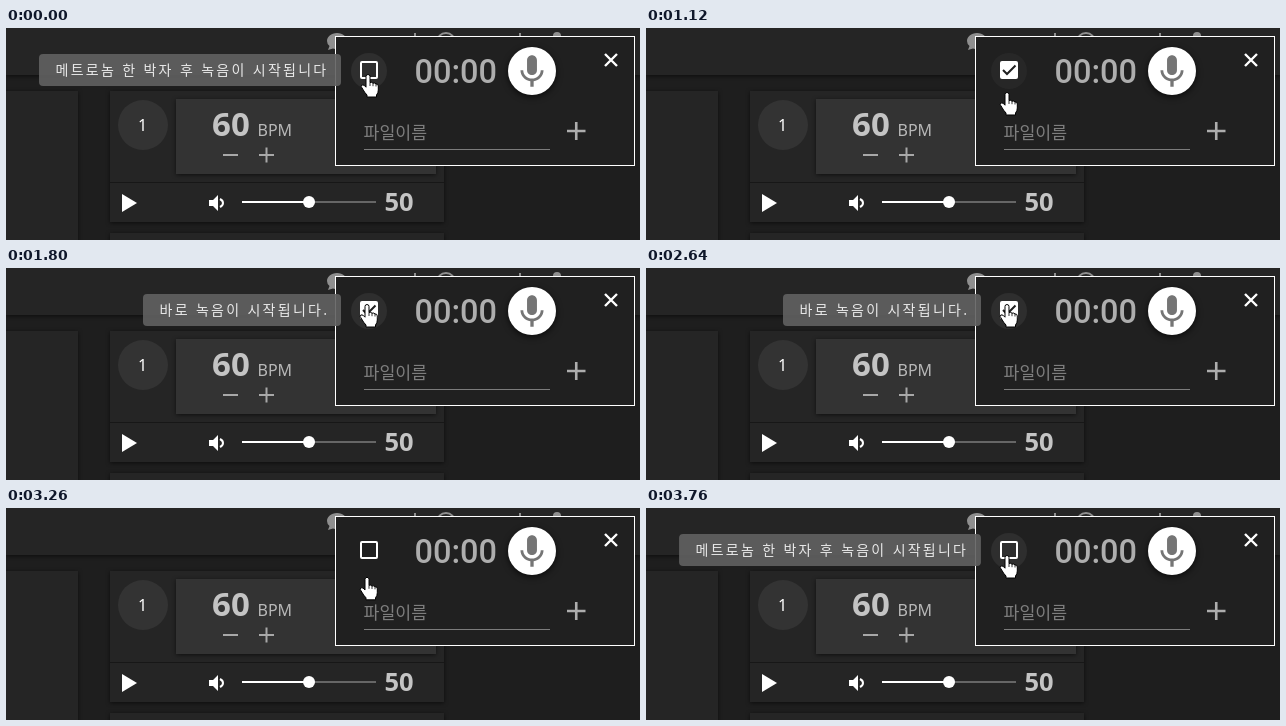
An HTML page for the animation above (4.59 s loop, 634 px wide and 212 px high).

```html
<!DOCTYPE html>
<html lang="ko">
<head>
<meta charset="utf-8">
<style>
html, body { margin: 0; width: 100%; height: 100%; overflow: hidden; background: #1e1e1e; }
svg { display: block; }
text { font-family: "Noto Sans", "Noto Sans CJK KR", "Noto Sans CJK", sans-serif; }
.kr { font-family: "Noto Sans CJK KR", "Noto Sans CJK", "Noto Sans", sans-serif; }
.card { fill: #252525; filter: drop-shadow(0 1px 2px #0009); }
.line { fill: none; stroke-width: 2; }
</style>
</head>
<body>
<svg width="634" height="212" viewBox="0 0 634 212">
  <rect width="634" height="212" fill="#1e1e1e"/>
  <rect class="card" y="-5" width="634" height="52"/>
  <rect class="card" x="-5" y="63" width="77" height="160"/>
  <rect class="card" x="104" y="63" width="334" height="131"/>
  <rect class="card" x="104" y="205" width="334" height="20"/>

  <!-- toolbar icons peeking out behind the dialog -->
  <g fill="#8f8f8f">
    <path d="M331 5c6 0 10 4 10 8s-4 8-10 8q-2 0-4-.6L322 22l1.500-4Q321 16 321 13c0-4 4-8 10-8z"/>
    <path d="M408 5h2v5h-2zM513 5h2v5h-2z"/>
    <circle cx="551" cy="8" r="4"/>
    <circle class="line" cx="440" cy="14" r="9" stroke="#8f8f8f" style="fill:none"/>
  </g>

  <!-- metronome -->
  <circle cx="137" cy="97" r="25" fill="#333"/>
  <text x="136.500" y="103" font-size="16" fill="#fff" text-anchor="middle">1</text>
  <rect class="card" x="170" y="71" width="260" height="75" style="fill:#333"/>
  <text x="206" y="108" font-size="33" font-weight="700" fill="#c4c4c4">60</text>
  <text x="251.500" y="108" font-size="16" fill="#b8b8b8">BPM</text>
  <path class="line" stroke="#a8a8a8" d="M217 127h15M253 127h15M260.500 119.500v15"/>
  <path d="M104 154.500h334" stroke="#171717"/>
  <path d="M116 166l15 9-15 9z" fill="#fff"/>
  <path d="M203 172h4l5-5v16l-5-5h-4z" fill="#fff"/>
  <path class="line" stroke="#fff" d="M214 171q3 1.500 3 4t-3 4"/>
  <path class="line" stroke="#666" d="M236 174h134"/>
  <path class="line" stroke="#fff" d="M236 174h67"/>
  <circle cx="303" cy="174" r="6" fill="#fff"/>
  <text x="378.500" y="183" font-size="25.500" font-weight="700" fill="#c4c4c4">50</text>

  <!-- recording dialog -->
  <rect x="329.500" y="8.500" width="299" height="129" fill="#202020" stroke="#fff"/>
  <circle id="halo" cx="363" cy="43" r="18" fill="#2e2e2e"/>
  <rect id="empty" class="line" x="355" y="34" width="16" height="16" rx="1" stroke="#fff"/>
  <g id="checked">
    <rect x="354" y="33" width="18" height="18" rx="2" fill="#fff"/>
    <path class="line" stroke="#202020" d="M357 42l4 4 8.500-8.500"/>
  </g>
  <text x="408.500" y="55" font-size="32.500" font-weight="500" fill="#adadad" style="font-family:Roboto,sans-serif">00:00</text>
  <circle cx="526" cy="43" r="24" fill="#fff" style="filter:drop-shadow(0 2px 3px #000a)"/>
  <path transform="translate(506.200 24) scale(1.650)" fill="#757575" d="M12 14c1.660 0 3-1.340 3-3V5c0-1.660-1.340-3-3-3S9 3.340 9 5v6c0 1.660 1.340 3 3 3zm5.300-3c0 3-2.540 5.100-5.300 5.100S6.700 14 6.700 11H5c0 3.410 2.720 6.230 6 6.720V21h2v-3.280c3.280-.48 6-3.300 6-6.720z"/>
  <path d="M599 26l12 12M611 26l-12 12" stroke="#fff" stroke-width="2.400"/>
  <text class="kr" x="357.500" y="111" font-size="17.300" fill="#7e7e7e">파일이름</text>
  <path d="M358 121.500h186" stroke="#7c7c7c"/>
  <path d="M561 103h18.500M570.250 94v18" stroke="#adadad" stroke-width="2.600"/>

  <g id="tip">
    <rect id="tipBox" height="32" rx="4" fill="#616161"/>
    <text id="tipText" class="kr" x="16.500" y="21" font-size="14" letter-spacing="2.250" fill="#fff"></text>
  </g>
  <circle id="click" r="11" fill="#ffee00" opacity=".58"/>
  <g id="hand" stroke="#000" stroke-linejoin="round">
    <path fill="#fff" d="M-2 1.500a2 2 0 0 1 4 0V7.500q2-.7 3 .7 2-.6 3 .7 2.300-.1 2.300 2.100v4q0 3-1.800 5v2H-1v-2q-2.500-2.500-4-5.500-1.300-2-1.800-3 0-2.600 2.800-1.300l2 2z"/>
    <path fill="none" d="M2 7.500v3.500M5 8.200v3M8 9v2.500" stroke-width=".8"/>
  </g>
</svg>
<script>
const LOOP = 4590;
const LONG = { text: "메트로놈 한 박자 후 녹음이 시작됩니다", w: 302 };
const SHORT = { text: "바로 녹음이 시작됩니다.", w: 198 };
const el = id => document.getElementById(id);
const set = (id, name, value) => el(id).setAttribute(name, value);

// keys are [time, value...]; values glide smoothly between them
const path = [
  [0, 362, 47], [910, 362, 47], [1120, 361, 65], [1300, 361, 64], [1390, 361, 64],
  [1490, 361, 39], [1580, 361, 37], [2640, 361, 37], [2740, 360, 46], [2990, 360, 46],
  [3160, 361, 78], [3390, 361, 58], [3420, 361, 58], [3540, 361, 48], [LOOP, 361, 48]
];
const halo = [
  [0, 1], [1000, 1], [1250, 0], [1480, 0], [1700, 1], [2910, 1], [3100, 0],
  [3350, 0], [3550, 1], [LOOP, 1]
];
function at(keys, t) {
  const i = keys.findIndex(k => k[0] > t), a = keys[i - 1], b = keys[i];
  const p = (t - a[0]) / (b[0] - a[0]), s = p * p * (3 - 2 * p);
  return a.slice(1).map((v, j) => v + (b[j + 1] - v) * s);
}

const clamp = v => Math.max(0, Math.min(1, v));

// cubic-bezier(0, 0, .2, 1)
function easeOut(x) {
  let lo = 0, hi = 1;
  for (let i = 0; i < 20; i++) {
    const m = (lo + hi) / 2;
    if (.6 * m * m * (1 - m) + m ** 3 < x) lo = m; else hi = m;
  }
  return lo * lo * (3 - 2 * lo);
}

function tooltip(t) {
  const grow = start => easeOut(clamp((t - start) / 300));
  const fade = start => 1 - clamp((t - start) / 200);
  if (t < 870) return [LONG, 33, 1, 1];
  if (t < 1300) return [SHORT, 33, 1, fade(890)];
  if (t < 2910) return [SHORT, 137, grow(1500), 1];
  if (t < 3300) return [LONG, 137, 1, fade(2930)];
  return [LONG, 33, grow(3470), 1];
}

function draw(now) {
  const t = now % LOOP;
  const [x, y] = at(path, t);
  set("hand", "transform", `translate(${x} ${y})`);
  set("click", "cx", x - 1);
  set("click", "cy", y);
  const pressed = start => t >= start && t < start + 80;
  set("click", "visibility", pressed(820) || pressed(2880) ? "visible" : "hidden");
  set("halo", "opacity", at(halo, t)[0]);

  const on = t >= 870 && t < 2910;
  set("checked", "visibility", on ? "visible" : "hidden");
  set("empty", "visibility", on ? "hidden" : "visible");

  const [msg, left, scale, alpha] = tooltip(t);
  el("tipText").textContent = msg.text;
  set("tipBox", "width", msg.w);
  set("tip", "opacity", scale > 0 ? .9 * alpha : 0);
  set("tip", "transform",
    `translate(${left + msg.w / 2} 42) scale(${scale}) translate(${-msg.w / 2} -16)`);
}

const begin = performance.now();
function tick() {
  draw(performance.now() - begin);
  requestAnimationFrame(tick);
}
tick();
</script>
</body>
</html>
```
